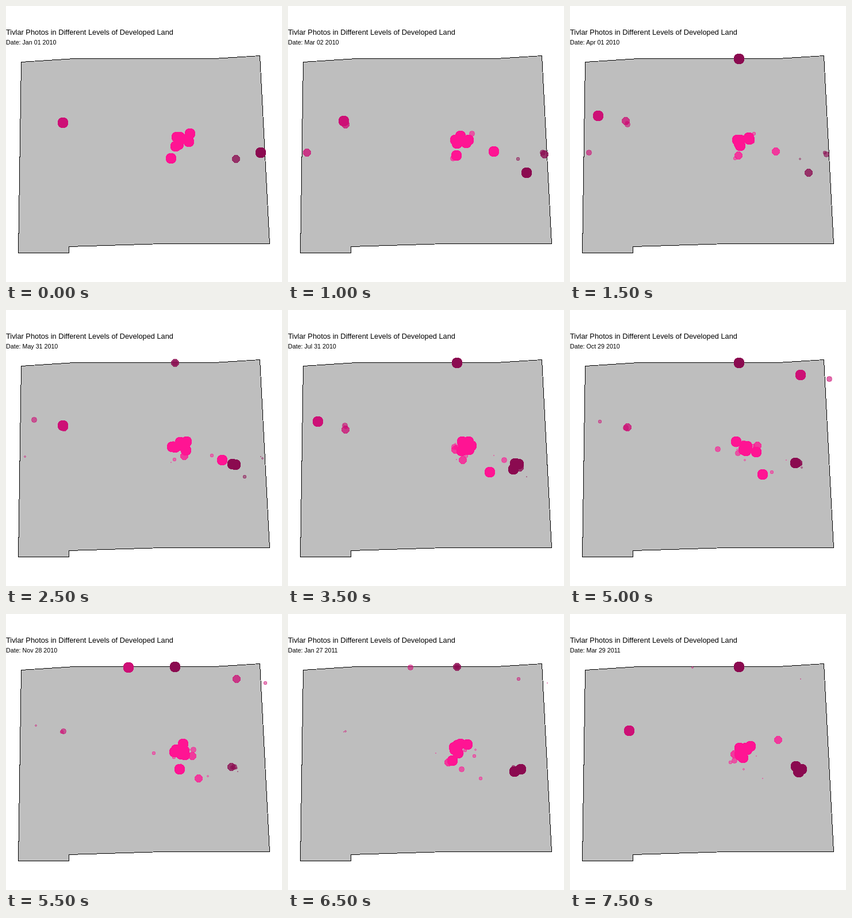
Recreate the animation shown at these times as an HTML page. Size 480 px wide and 480 px high, loop 8 s.

```html
<!DOCTYPE html>
<html>
<head>
<meta charset="utf-8">
<style>
html, body { margin: 0; width: 100%; height: 100%; overflow: hidden; background: #fff; }
svg { display: block; shape-rendering: crispEdges; }
text { font-family: "Liberation Sans", Arial, sans-serif; }
</style>
</head>
<body>
<svg width="480" height="480">
  <text y="50" font-size="12.8">Tivlar Photos in Different Levels of Developed Land</text>
  <text id="date" y="67" font-size="10.7"></text>
  <path d="M26.5 97.5 119 91.5H362L441.5 86.5 458.5 413.5H272L109.5 418.5V429.5H21.5Z" fill="#bebebe" stroke="#000"/>
  <g id="dots"></g>
</svg>
<script>
const STEP = 500, STEPS = 16, LIFE = 8, SIZE = 9;
const DAY = 864e5, START = Date.UTC(2010, 0, 1);
const HIGH = '#ff1493', MEDIUM = '#cd1076', LOW = '#8b0a50';

let seed = 7;
const random = () => (seed = seed * 16807 % 2147483647) / 2147483647;

const photos = [];
const add = (step, x, y, color, life = LIFE) => photos.push({ step, x, y, color, life });

// scatters photos over an ellipse; only the first one leaves a trail
function scatter(step, count, x, y, rx, ry, color) {
  for (let i = 0; i < count; i++) {
    const angle = 2 * Math.PI * random(), reach = Math.sqrt(random());
    add(step, Math.round(x + rx * reach * Math.cos(angle)),
      Math.round(y + ry * reach * Math.sin(angle)), color, i ? 1 : LIFE);
  }
}

for (let step = 0; step < STEPS; step++) {
  scatter(step, 7, 302, 236, 17, 11, HIGH);
  scatter(step, 1, 305, 248, 30, 28, HIGH);
  if (step < 10) scatter(step, 1, step % 4 === 3 ? 52 : 99, step % 4 === 3 ? 191 : 204, 4, 5, MEDIUM);
  if (step > 2 && step % 4 !== 1) add(step, 294, 92, LOW);
  if (step > 3) {
    const visits = Math.round(2 + 2 * Math.cos((step - 7) * Math.PI / 4));
    scatter(step, visits, 396, 272, 9, 8, LOW);
  }
}

// single photos far from the busy places: step, x, y
const outings = {
  [HIGH]: [[0, 320, 222], [2, 358, 253], [5, 376, 261], [7, 351, 282],
    [8, 257, 242], [10, 335, 286], [14, 362, 219]],
  [MEDIUM]: [[1, 33, 255], [8, 451, 120], [10, 401, 113], [11, 213, 93], [15, 103, 203]],
  [LOW]: [[-1, 400, 266], [0, 443, 255], [1, 446, 258], [2, 415, 290]]
};
for (const color in outings)
  for (const [step, x, y] of outings[color]) add(step, x, y, color);

photos.sort((a, b) => a.step - b.step);

function dot({ x, y, color }, age) {
  const r = SIZE * (1 - age / LIFE) ** 2.4;
  const alpha = age ? .25 + .08 * r : 1;
  const rim = Math.min(1, r / 3);
  return `<circle cx="${x}" cy="${y}" r="${r}" fill="${color}" stroke="${color}"
    stroke-width="${rim}" fill-opacity="${alpha}" stroke-opacity="${alpha}"/>`;
}

function dateText(step) {
  const [, day, month, year] = new Date(START + Math.floor(30.15 * step) * DAY).toUTCString().split(' ');
  return `Date: ${month} ${day} ${year}`;
}

function draw(step) {
  document.getElementById('date').textContent = dateText(step);
  document.getElementById('dots').innerHTML = photos
    .filter(p => p.step <= step && step < p.step + p.life)
    .map(p => dot(p, step - p.step)).join('');
}

const began = performance.now();
let shown = -1;
function tick() {
  const step = Math.floor((performance.now() - began) / STEP) % STEPS;
  if (step !== shown) draw(shown = step);
  requestAnimationFrame(tick);
}
tick();
</script>
</body>
</html>
```
